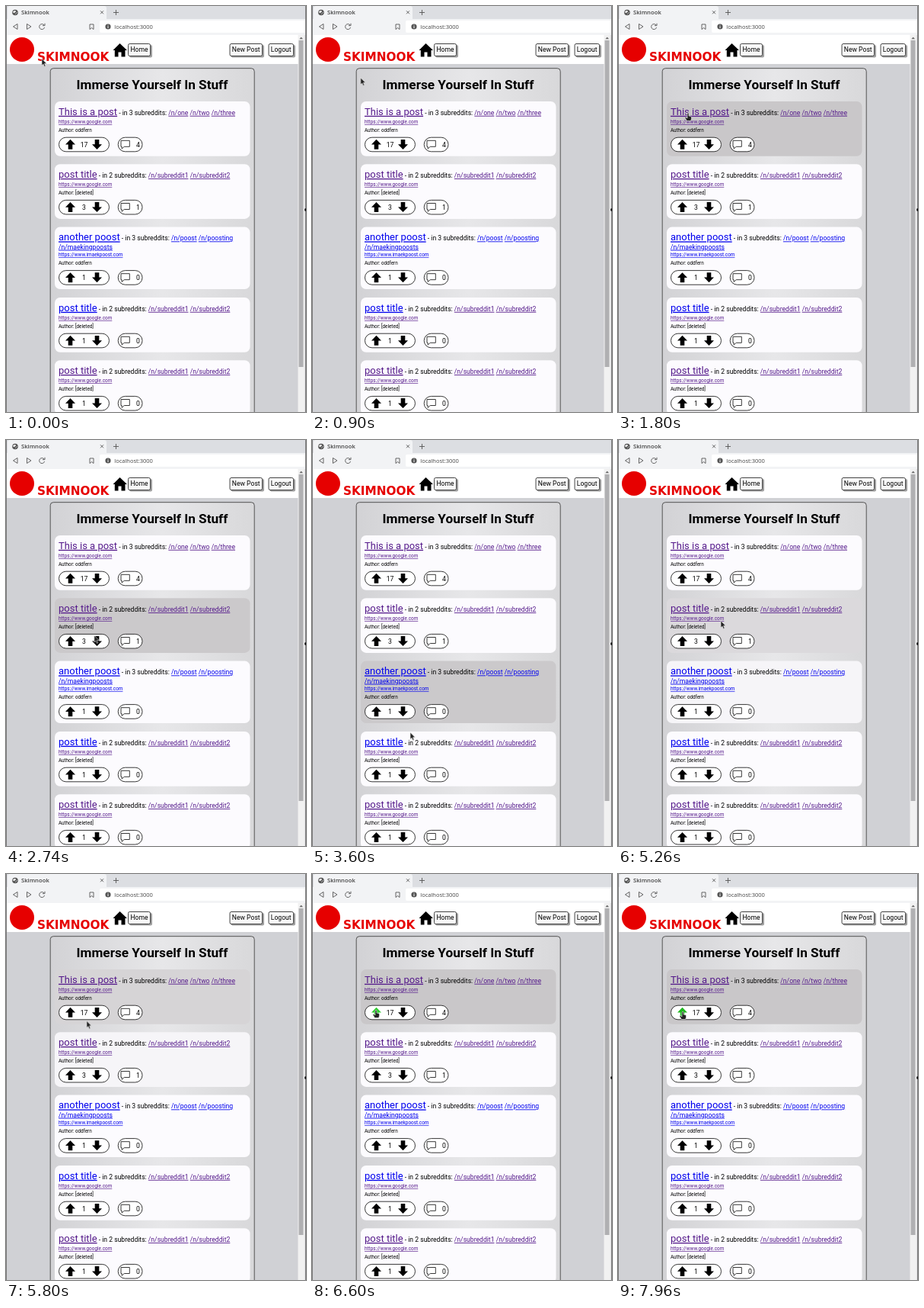
An HTML page for the animation above (8000 ms loop, 394 by 532 pixels).

```html
<!DOCTYPE html>
<html lang="en">
<head>
<meta charset="utf-8">
<title>Skimnook</title>
<style>
  html, body { margin: 0; width: 100%; height: 100%; overflow: hidden; background: #d0d1d5; }
  svg { display: block; width: 394px; height: 532px; font-family: Roboto, sans-serif; }
  .browser { font-family: "Open Sans", sans-serif; font-size: 7.5px; fill: #444; }
  .icon { fill: none; stroke: #555; stroke-width: .9; }
  .brand { font: bold 15.3px "DejaVu Sans", sans-serif; fill: #e60000; }
  .heading { font-size: 17.2px; font-weight: bold; }
  .body { font-size: 8.6px; }
  .title { font-size: 13px; }
  .small { font-size: 6.42px; }
  .author { font-size: 6.3px; }
  .link { text-decoration: underline; text-decoration-thickness: .8px; }
  .visited { fill: #551a8b; }
  .fresh { fill: #0000ee; }
  .mid { text-anchor: middle; }
  .pill { fill: #fff; stroke: #222; stroke-width: .9; }
</style>
</head>
<body>
<svg viewBox="0 0 394 532">
  <defs>
    <linearGradient id="panel">
      <stop stop-color="#d2d2d5"/><stop offset=".55" stop-color="#e7e7e9"/><stop offset="1" stop-color="#d8d8da"/>
    </linearGradient>
    <path id="arrow" d="M0-6.7 6.5 0H2.8V6.3H-2.8V0H-6.5Z"/>
    <path id="bubble" d="M-5.5-5H5.8V3H-1.2L-4.4 5.8V3H-5.5Z" fill="none" stroke="#222" stroke-width=".9"/>
  </defs>

  <rect width="394" height="532" fill="#d0d1d5"/>

  <g class="browser">
    <rect width="394" height="18" fill="#dcdee2"/>
    <path d="M2 18V3Q2 0 5 0H129Q132 0 132 3V18Z" fill="#f2f3f5"/>
    <rect y="17" width="394" height="21" fill="#f2f3f5"/>
    <rect x="123" y="19" width="271" height="16" rx="2" fill="#fff"/>
    <circle cx="12" cy="8.5" r="3.8" fill="#555"/>
    <path d="M9 8Q11 5 13 7L11 9ZM12 11 15 8" fill="#eee" stroke="#eee" stroke-width=".6"/>
    <text x="20" y="11.3" font-size="7.7" font-weight="600">Skimnook</text>
    <path class="icon" d="M124 6.3 128 10.3M128 6.3 124 10.3M141 8.5H148M144.5 5V12"/>
    <path class="icon" d="M15 23.5V30.5L9.5 27ZM27.5 23.5V30.5L33 27ZM50 25A3.5 3.5 0 1 0 50.6 28M51 22.8V25.7H48M110 24H115V30.6L112.5 28.5 110 30.6Z"/>
    <circle cx="134" cy="27" r="3.6" fill="#555"/>
    <path d="M134 26.3V29M134 24.7V25.5" stroke="#fff"/>
    <text x="142.3" y="29.8">localhost:3000</text>
  </g>

  <rect y="38" width="384" height="38" fill="#fff"/>
  <circle cx="21" cy="57" r="16" fill="#e60000"/>
  <text class="brand" x="41" y="72">SKIMNOOK</text>
  <path d="M149.5 49 159 58H156.5V66.5H151.5V60.5H147.5V66.5H142.8V58H140.5Z"/>
  <g id="buttons" class="body mid"></g>

  <rect x="58.2" y="81.7" width="268" height="470" rx="4" fill="url(#panel)" stroke="#444" stroke-width=".9"/>
  <text class="heading mid" x="192" y="109.4">Immerse Yourself In Stuff</text>
  <g id="posts"></g>

  <rect x="383.5" y="38" width="9" height="494" fill="#f1f1f1"/>
  <rect x="384.5" y="45" width="6" height="428" fill="#b0b0b2"/>
  <path d="M385.3 43.3 387.7 40.7 390 43.3Z" fill="#666"/>
  <path d="M.5 0V532M393.5 0V532" stroke="#777"/>
  <circle cx="394" cy="267" r="2" fill="#111"/>

  <g id="cursor" stroke="#eee" stroke-width=".6" fill="#222">
    <path id="pointer" d="M0 0V9L2 7.2 3.5 10.4 5 9.7 3.6 6.6H6.4Z"/>
    <path id="hand" d="M-1 1Q0-.8 1 1V4L4.5 5V8L3.5 10.5H-1.5L-4 6.5-3 5.5-1 7Z"/>
  </g>
</svg>
<script>
const LOOP = 8000, FADE = 400;
const $ = id => document.getElementById(id);

// Each step is [time in ms, value]; easing applies between steps.
function play(el, prop, steps, easing) {
  const last = steps[steps.length - 1];
  const all = last[0] < LOOP ? [...steps, [LOOP, last[1]]] : steps;
  el.animate(all.map(([t, v]) => ({ offset: t / LOOP, [prop]: v, easing })),
    { duration: LOOP, iterations: Infinity });
}

function fade(el, prop, off, on, spans) {
  const steps = [[0, off]];
  for (const [start, end] of spans) {
    steps.push([start, off], [Math.min(start + FADE, end), on]);
    if (end < LOOP) steps.push([end, on], [end + FADE, off]);
  }
  play(el, prop, steps, "ease");
}

$("buttons").innerHTML = [["Home", 160, 30], ["New Post", 293.5, 43.5], ["Logout", 344.5, 33.5]]
  .map(([label, x, w]) => `
    <rect x="${x + 2}" y="51" width="${w}" height="16.5" rx="2" fill="#777" opacity=".7"/>
    <rect x="${x + .5}" y="49.5" width="${w - 1}" height="16" rx="2" fill="#f8f8f8" stroke="#333" stroke-width=".9"/>
    <text x="${x + w / 2}" y="60.3">${label}</text>`).join("");

const google = "https://www.google.com", pair = ["subreddit1", "subreddit2"];
const posts = [
  { y: 125, title: "This is a post", subs: ["one", "two", "three"], url: google, author: "oddfern",
    votes: 17, replies: 4, hover: [[1280, 2380], [5620, LOOP]] },
  { y: 207.2, title: "post title", subs: pair, url: google, author: "[deleted]",
    votes: 3, replies: 1, hover: [[2440, 2880], [5110, 5560]] },
  { y: 289.6, title: "another poost", subs: ["poost", "poosting"], wrapped: "maekingpoosts",
    url: "https://www.imaekpoost.com", author: "oddfern", votes: 1, replies: 0,
    fresh: true, freshTitle: true, hover: [[2940, 3580], [4790, 5020]] },
  { y: 382, title: "post title", subs: pair, url: google, author: "[deleted]",
    votes: 1, replies: 0, freshTitle: true, hover: [[3600, 4140], [4580, 4770]] },
  { y: 464.2, title: "post title", subs: pair, url: google, author: "[deleted]",
    votes: 1, replies: 0, hover: [[4190, 4520]] }
];

const link = (text, fresh, extra = "") =>
  `<tspan class="link ${fresh ? "fresh" : "visited"} ${extra}">${text}</tspan>`;

function postMarkup(p) {
  const shift = p.wrapped ? 9.8 : 0;
  const subs = p.subs.map(s => link("/n/" + s, p.fresh)).join(" ");
  return `<g transform="translate(0 ${p.y})">
    <rect class="card" x="64" width="256.5" height="${71.7 + shift}" rx="7" fill="#fcfbfe"/>
    <text class="body" x="69" y="17.8">${link(p.title, p.freshTitle, "title")} - in ${p.subs.length + !!p.wrapped} subreddits: ${subs}</text>
    ${p.wrapped ? `<text class="body" x="69" y="29">${link("/n/" + p.wrapped, p.fresh)}</text>` : ""}
    <g transform="translate(0 ${shift})">
      <text class="small" x="69" y="29">${link(p.url, p.fresh)}</text>
      <text class="author" x="69" y="39.5">Author: ${p.author}</text>
      <rect class="pill" x="69.5" y="47.2" width="66" height="18.6" rx="9.3"/>
      <rect class="pill" x="147.2" y="47.2" width="31.8" height="18.6" rx="9.3"/>
      <use class="up" href="#arrow" x="84.5" y="56.5"/>
      <use href="#arrow" transform="translate(119.5 56.2) scale(1 -1)"/>
      <use href="#bubble" x="156.5" y="56.3"/>
      <g class="body mid"><text x="102.5" y="59.6">${p.votes}</text><text x="173.5" y="59.6">${p.replies}</text></g>
    </g>
  </g>`;
}

$("posts").innerHTML = posts.map(postMarkup).join("");
document.querySelectorAll(".card").forEach((card, i) =>
  fade(card, "fill", "#fcfbfe", "#c9c7c9", posts[i].hover));
play(document.querySelector(".up"), "fill",
  [[0, "#000"], [6200, "#000"], [6500, "#35d435"], [7100, "#20b820"]], "ease");

const path = [
  [0, 47, 69], [600, 47, 69], [1300, 86, 127], [1600, 92, 140], [2000, 92, 140],
  [2500, 110, 215], [3000, 122, 300], [3540, 129, 360], [3600, 129, 383], [4150, 148, 456],
  [4350, 150, 480], [4520, 149, 464], [4660, 147, 416], [5040, 139, 292], [5260, 135, 237],
  [5600, 120, 202], [6000, 92, 183], [6300, 84, 178], [6600, 84, 178], [7300, 85, 180]
];
play($("cursor"), "transform", path.map(([t, x, y]) => [t, `translate(${x}px, ${y}px)`]), "linear");

const linkSpans = [[1450, 2060], [6080, LOOP]];
const toggle = (el, off, on) => play(el, "opacity",
  [[0, off], ...linkSpans.flatMap(([a, b]) => b < LOOP ? [[a, on], [b, off]] : [[a, on]])], "steps(1, end)");
toggle($("hand"), 0, 1);
toggle($("pointer"), 1, 0);
</script>
</body>
</html>
```
